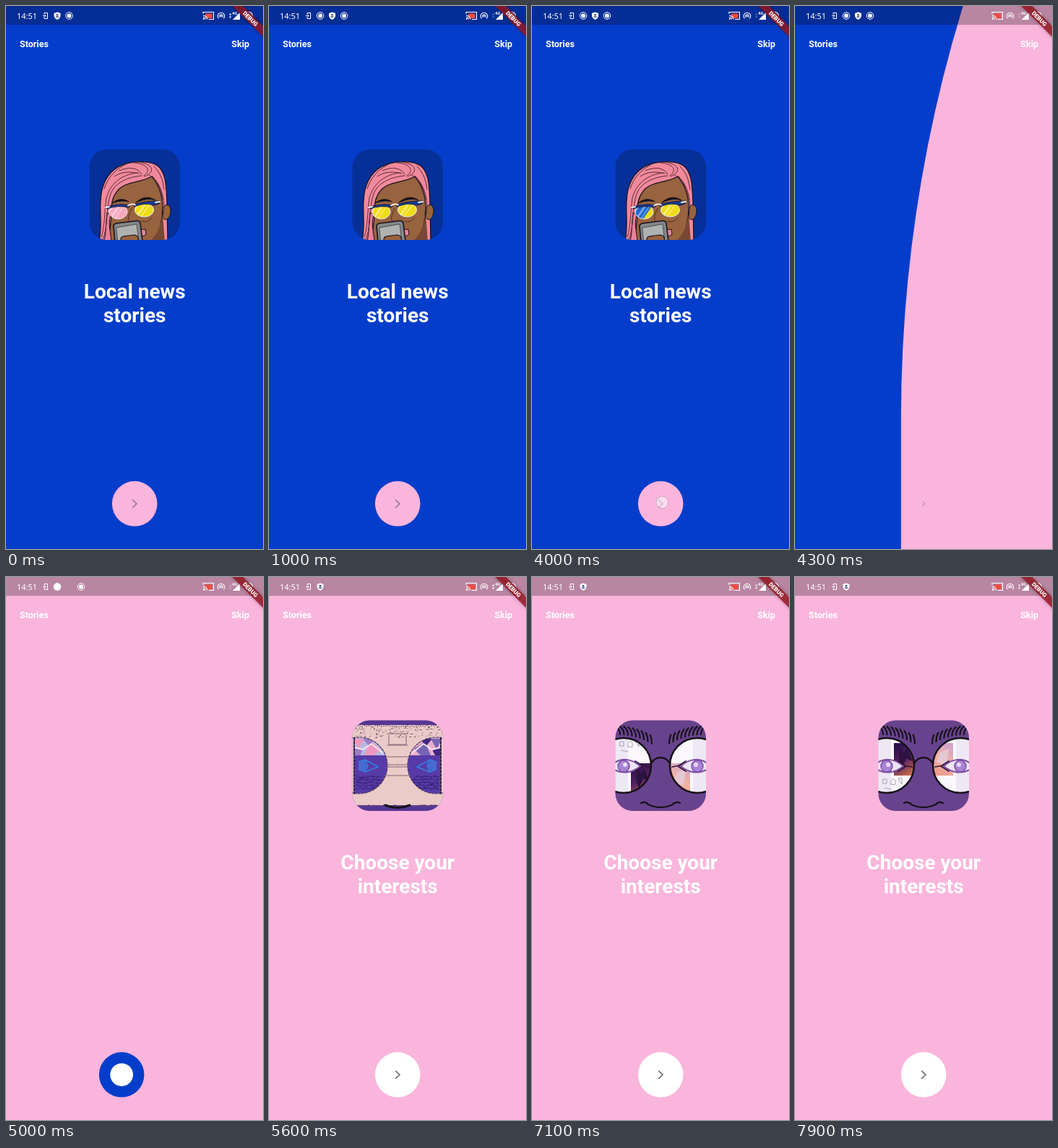
Animation, 356 px wide and 752 px high, one loop 8000 ms. Source, as an HTML page with a canvas:

```html
<!DOCTYPE html>
<html lang="en">
<head>
<meta charset="utf-8">
<title>Stories onboarding</title>
<style>
html, body { margin: 0; width: 100%; height: 100%; overflow: hidden; background: #053dcb; }
canvas { display: block; width: 356px; height: 752px; }
</style>
</head>
<body>
<canvas id="stage" width="356" height="752"></canvas>
<script>
const ctx = document.getElementById('stage').getContext('2d');
const W = 356, H = 752, LOOP = 8000;
const BLUE = '#053dcb', PINK = '#fab5dc', INK = '#17121b';
const BUTTON = { x: 178.2, y: 689.3, r: 31.3 };
const clamp = (v, a = 0, b = 1) => Math.min(b, Math.max(a, v));

function scoped(draw) { ctx.save(); draw(); ctx.restore(); }

function paint(fill, stroke, width = 1) {
  if (fill) { ctx.fillStyle = fill; ctx.fill(); }
  if (stroke) { ctx.strokeStyle = stroke; ctx.lineWidth = width; ctx.stroke(); }
}

function disc(x, y, r, fill, stroke, width) {
  ctx.beginPath();
  ctx.arc(x, y, r, 0, Math.PI * 2);
  paint(fill, stroke, width);
}

function oval(x, y, rx, ry, fill, stroke, width) {
  ctx.beginPath();
  ctx.ellipse(x, y, rx, ry, 0, 0, Math.PI * 2);
  paint(fill, stroke, width);
}

function shape(d, fill, stroke, width = 1) {
  const path = new Path2D(d);
  if (fill) { ctx.fillStyle = fill; ctx.fill(path); }
  if (stroke) { ctx.strokeStyle = stroke; ctx.lineWidth = width; ctx.stroke(path); }
}

function rect(x, y, w, h, fill) { ctx.fillStyle = fill; ctx.fillRect(x, y, w, h); }

function label(text, x, y, font, align = 'left') {
  ctx.font = font;
  ctx.textAlign = align;
  ctx.fillStyle = '#fff';
  ctx.fillText(text, x, y);
}

function seeded(seed) {
  return () => (seed = (seed * 16807) % 2147483647) / 2147483647;
}

// Page progress: steady for most of the way, easing out at the end.
function progressAt(t) {
  if (t < 5000) return clamp((t - 4065) / 1094);
  const u = clamp((t - 5000) / 320);
  return 0.855 + 0.145 * u * (2 - u);
}

// Lens colours: [phase, colour], each arriving with a diagonal wipe.
const LEFT_TINTS = [[0, '#f6a9bd'], [0.2, '#1767d2'], [0.47, '#f0dc16'], [0.78, '#f6a9bd']];
const RIGHT_TINTS = [[0, '#f0dc16'], [0.18, '#1767d2'], [0.41, '#f0dc16'], [0.7, '#f6a9bd'], [0.9, '#f0dc16']];

function lens(x, y, rx, ry, tints, phase) {
  const index = tints.filter(tint => tint[0] <= phase).length - 1;
  const before = tints[(index + tints.length - 1) % tints.length][1];
  const [start, now] = tints[index];
  const wipe = clamp((phase - start) / 0.08);
  scoped(() => {
    oval(x, y, rx, ry, before);
    ctx.clip();
    ctx.translate(x, y);
    ctx.rotate(0.6);
    rect(rx * 1.5 - wipe * rx * 3, -30, 60, 60, now);
    ctx.globalAlpha = 0.4;
    const pale = now === '#1767d2' ? '#55b5ef' : '#fff';
    rect(-5, -20, 3, 40, pale);
    rect(1, -20, 1.5, 40, pale);
    rect(-rx - 4, -20, 7, 40, pale);
  });
  oval(x, y, rx, ry, null, '#e9eef7', 1);
}

function drawReporter(t) {
  const phase = (t / 1600) % 1;
  const skin = '#98633f', hair = '#f1899c';
  rect(115, 198, 127, 126, '#062f98');

  shape('M129 326C133 306 130 289 131 270C132 248 140 232 155 223C171 214 202 212 213 224C222 235 222 252 223 274L224 326Z', hair, INK, 1.2);
  shape('M219 277C226 272 230 280 227 290C224 298 218 297 217 292Z', skin, INK);
  shape('M142 326L146 291C145 275 147 263 157 253C168 243 186 245 202 236C211 247 217 260 217 280C217 300 211 314 206 326Z', skin, INK, 1.2);
  shape('M199 326C210 317 215 302 217 288L220 326Z', '#774833');
  shape('M145 290C141 300 145 314 146 326L136 326C139 314 138 299 140 286Z', '#ec7f98', INK);

  // Hair strands
  shape('M188 235C170 237 152 243 145 260C138 280 142 304 134 324M182 231C162 233 145 244 139 266C136 288 137 305 132 320M166 219C152 226 141 237 136 253M177 217C194 218 203 227 191 235M184 216C206 219 206 231 192 236M157 228C171 222 183 224 188 233M150 236C160 229 172 229 184 232M205 222C216 233 217 243 219 254M198 234C210 243 216 254 218 268M203 236C213 246 217 258 219 276', null, '#572a38', 1);

  shape('M147 273C154 267 163 266 170 271C163 269 155 270 147 273ZM180 272C189 264 198 263 207 269C198 266 190 268 180 272Z', INK, INK, 1);
  shape('M174 280C170 289 168 294 171 298M188 298C194 301 200 296 202 293', null, '#4f2f28', 1);

  lens(155.5, 285, 12.5, 10, LEFT_TINTS, phase);
  lens(191.5, 282.5, 13, 9.5, RIGHT_TINTS, phase);
  shape('M138 279C149 274 161 274 171 276L170 279C160 277 149 277 141 281ZM177 275C188 271 201 270 213 270L212 274L205 276C195 273 187 274 178 278Z', '#173b9b', INK, 0.8);
  shape('M169 276.5Q174 273 179 275.5M138 279L143 278M207 272L213 271', null, '#f6f3ec', 1.8);

  shape('M184 311C188 307 190 311 193 309L194 316C190 320 187 319 184 317Z', '#e9849b', INK);
  shape('M149 305Q149 302 153 301L181 297.5Q185 297 186 301L189 326L151 326Z', '#85888b', INK, 1.6);
  shape('M153 307L181 302L184 326L155 326Z', '#b0b1b1', '#4c4e50', 1);
  shape('M159 326C158 318 163 319 170 318L178 317C184 318 183 322 184 326Z', skin, INK, 1.2);
}

function mirrored(draw) {
  draw(1);
  scoped(() => { ctx.translate(W, 0); ctx.scale(-1, 1); draw(-1); });
}

function drawSketch() {
  const rand = seeded(41);
  rect(115, 198, 127, 126, '#553794');
  rect(115, 205, 127, 111, '#eacbc8');
  mirrored(side => {
    scoped(() => {
      ctx.beginPath();
      ctx.rect(119, 220, 50, 82);
      ctx.clip();
      disc(125, 261, 39, '#573aa7');
      ctx.clip();
      rect(115, 222, 50, 25, side > 0 ? '#b8b9e2' : '#e7afce');
      shape('M116 224L132 224L124 238ZM140 228L155 238L146 247L132 247Z', side > 0 ? '#ef98bf' : '#7564b5');
      shape('M130 224L146 224L139 235ZM118 236L130 239L126 247L118 247Z', side > 0 ? '#9d7cc4' : '#412683');
      shape('M118 236L130 239L142 231L158 244', null, '#f5e5ee', 2);
      shape('M124 256L133 253L151 263L133 270L124 266M133 253L137 262L133 270', null, '#3181e1', 1.6);
      shape('M124 256L132 254L136 262L132 269L124 266Z', '#466bd0');
      for (let y = 275; y < 292; y += 4) {
        for (let x = 121; x < 155; x += 3) rect(x, y + rand() * 2, 1.5 + rand() * 2, 1.5, '#33216f');
      }
    });
    scoped(() => {
      ctx.setLineDash([3, 2]);
      disc(125, 261, 39, null, '#4b3558', 1.2);
      shape('M118 223L118 300', null, '#34204f', 2);
    });
    shape('M164 217L178 217M166 219L166 232L178 232M164 233L178 233M163 249L178 249M163 260L178 260M163 263L178 263M161 275L178 275', null, '#816573', 1);
  });
  for (let i = 0; i < 150; i++) {
    const x = 117 + rand() * 122, y = 206 + rand() * 16;
    rect(x, y, 1 + rand() * 1.5, 1, i % 3 ? '#ad9095' : '#59405b');
  }
  for (let x = 116; x < 241; x += 3) {
    rect(x, 205 + rand() * 2, 2, 1, '#735369');
    rect(x, 315 + rand() * 2, 2, 1, '#735369');
  }
  shape('M161 316Q178 323 195 316', null, INK, 3);
}

function drawFace(t) {
  const period = 80;
  const shift = (7900 - t) * 0.035;
  const feedY = 230 + ((shift % period) + period) % period;
  rect(115, 198, 127, 126, '#68438d');
  mirrored(side => {
    scoped(() => {
      disc(127, 261, 38, '#faf8fc');
      ctx.clip();
      rect(115, 223, 18, 76, '#eee8f5');
      for (const y of [feedY, feedY - period]) {
        const glow = ctx.createLinearGradient(137, y, 166, y + 45);
        const colours = side > 0 ? ['#241044', '#532062', '#e17a45'] : ['#cba0d3', '#f1b4a4', '#ed9280'];
        colours.forEach((colour, i) => glow.addColorStop(i / 2, colour));
        rect(137, y, 30, 45, glow);
        if (side > 0) {
          shape(`M145 ${y + 6}l6 8 4-7 8 18-9-4-6 14-4-13z`, '#2b123f');
          shape(`M122 ${y + 50}l5 0 0 6-5 0zM133 ${y + 57}q-1-7 3-7t3 7zM143 ${y + 50}l5 7 0-8zM124 ${y + 62}l9 2`, null, '#aaa0b4', 1);
        } else {
          shape(`M143 ${y + 8}l12 5 5 13-14 5z`, '#e7c8d1');
        }
      }
      shape('M112 259C123 250 138 251 150 262C138 272 124 273 112 266Z', '#eee5f7', '#8051a1', 2.2);
      disc(127, 262, 8, '#aa83d4', '#7950a7', 1.5);
      disc(129, 260, 3, '#e7dbf6');
      shape('M143 255L154 262L143 269M151 261L162 263', null, '#321638', 1.7);
    });
    disc(127, 261, 38, null, INK, 2.6);
    for (let i = 0; i < 9; i++) {
      const x = 122 + i * 5.5, y = 218 + i * i * 0.2;
      shape(`M${x} ${y}q0 -7 ${-7 + i * 0.6} -12`, null, INK, 2.2);
    }
  });
  shape('M165 258Q170 250 178 250Q186 250 191 258', null, INK, 2.4);
  shape('M151 313Q157 310 161 315Q178 323 195 315Q199 310 205 313', null, INK, 2.4);
}

function content(lines, art, alpha, scale) {
  if (alpha <= 0) return;
  scoped(() => {
    ctx.globalAlpha = alpha;
    ctx.translate(W / 2, H / 2);
    ctx.scale(scale, scale);
    ctx.translate(-W / 2, -H / 2);
    lines.forEach((line, i) => label(line, 178.2, 405 + i * 33, '700 28px Roboto, sans-serif', 'center'));
    ctx.beginPath();
    ctx.roundRect(115.5, 198.5, 125.5, 125.5, 24);
    ctx.clip();
    ctx.lineCap = ctx.lineJoin = 'round';
    // Inner details set their own alpha, so the artwork waits until it is mostly visible.
    if (alpha > 0.5) art();
  });
}

function arrow(scale, colour, alpha = 1) {
  scoped(() => {
    ctx.globalAlpha = alpha;
    ctx.translate(BUTTON.x, BUTTON.y);
    ctx.scale(scale, scale);
    shape('M-3 -5.5L2.8 0L-3 5.5', null, colour, 1.7);
  });
}

// A button-sized circle scaled by 2^power; its corners lag behind, leaving straight sides.
function blob(x, power, anchor, colour) {
  const half = BUTTON.r * 2 ** power;
  const left = anchor === 'left' ? x : x - 2 * half;
  ctx.beginPath();
  ctx.roundRect(left, BUTTON.y - half, 2 * half, 2 * half, half * (1 - 0.0095 * power));
  paint(colour);
}

function drawPages(t) {
  const p = progressAt(t);
  const { x, y, r } = BUTTON;
  if (p < 0.5) {
    rect(0, 0, W, H, BLUE);
    content(['Local news', 'stories'], () => drawReporter(t), 1 - p / 0.15, 1 - 0.3 * p);
    blob(x - r, Math.min(12, 28 * p), 'left', PINK);
    arrow(1 - 2 * p, '#95809a');
    if (t > 3900 && t < 4100) disc(180.5, 687.5, 8.5, 'rgba(255,255,255,.5)', 'rgba(140,120,140,.45)', 1);
    return;
  }
  const half = (p - 0.5) * 2;
  const edge = x - r + 2 * r * half;
  rect(0, 0, W, H, PINK);
  if (p < 1) blob(edge, clamp(15 - 43 * (p - 0.5), 0, 12), 'right', BLUE);
  disc(edge - r, y, r * half * half, '#fff');
  const art = () => t < 6700 ? drawSketch() : drawFace(t);
  content(['Choose your', 'interests'], art, clamp((p - 0.88) / 0.12), 1 - 0.3 * (1 - p));
  arrow(half, '#757575', clamp((p - 0.9) / 0.1));
}

function ringIcon(x, alpha = 1) {
  if (alpha <= 0) return;
  scoped(() => {
    ctx.globalAlpha = alpha;
    disc(x, 13.5, 4.8, null, '#fff', 1);
    disc(x, 13.5, 3, '#fff');
  });
}

function shieldIcon(x) {
  scoped(() => {
    ctx.translate(x, 13.5);
    shape('M0 -5L4.5 -3.4V0Q4 3.8 0 5.5Q-4 3.8 -4.5 0V-3.4Z', '#fff');
    disc(0, -1.2, 1.3, '#273d82');
    rect(-2, 0.8, 4, 1.4, '#273d82');
  });
}

function drawStatusBar(t) {
  rect(0, 0, W, 26, 'rgba(0,0,0,.265)');
  label('14:51', 15, 18, '11px "Noto Sans", sans-serif');
  shape('M53 12V9.5H57.5V17.5H53V15M51 13.5H55M53.8 12.2L55.2 13.5L53.8 14.8', null, '#fff', 1);

  const added = clamp((t - 500) / 250);
  const removed = clamp((t - 4880) / 250);
  const shift = added * (1 - removed);
  ringIcon(71, shift);
  if (t < 4950 || t > 5050) shieldIcon(71 + 16.5 * shift);
  else disc(71, 13.5, 5.2, '#fff');
  ringIcon(87.5 + 16.5 * added, 1 - clamp((t - 5050) / 150));

  rect(276, 10.5, 9.5, 6.5, '#ef4c3c');
  shape('M273 11V8.5H287.5V18.5H281M273 13.2Q278.5 13.5 279 18.5M273 15.8Q276 16 276.5 18.5', null, '#fff', 1.1);
  disc(273.8, 18, 0.9, '#fff');

  for (const r of [2.3, 4.8]) {
    ctx.beginPath();
    ctx.arc(298, 14, r, Math.PI * 0.75, Math.PI * 2.25);
    paint(null, '#fff', 1.1);
  }
  disc(298, 14, 1.1, '#fff');

  const active = t < 1000 || t > 5300;
  shape('M309 12.5L310.7 10L312.4 12.5ZM309 14.5L310.7 17L312.4 14.5Z', active ? '#fff' : 'rgba(255,255,255,.35)');
  shape('M324 9V19H314Z', '#fff');
  label('4G', 313, 12, '700 6px Roboto, sans-serif');
  disc(336.5, 13.5, 5, null, '#fff', 1.3);
  disc(336.5, 13.5, 3, '#fff');
}

function drawBanner() {
  scoped(() => {
    ctx.translate(W, 0);
    ctx.rotate(Math.PI / 4);
    scoped(() => {
      ctx.shadowColor = 'rgba(0,0,0,.8)';
      ctx.shadowBlur = 5;
      rect(-40, 19.6, 80, 10.4, 'rgba(0,0,0,.4)');
    });
    rect(-40, 19.6, 80, 10.4, 'rgba(183,28,40,.68)');
    label('DEBUG', 0, 27.6, '900 8px Roboto, sans-serif', 'center');
  });
}

function render(now) {
  const t = now % LOOP;
  drawPages(t);
  drawStatusBar(t);
  const font = '700 12.5px Roboto, sans-serif';
  label('Stories', 19, 57, font);
  label('Skip', 337, 57, font, 'right');
  drawBanner();
}

const startTime = performance.now();
function tick() {
  render(performance.now() - startTime);
  requestAnimationFrame(tick);
}
tick();
</script>
</body>
</html>
```
